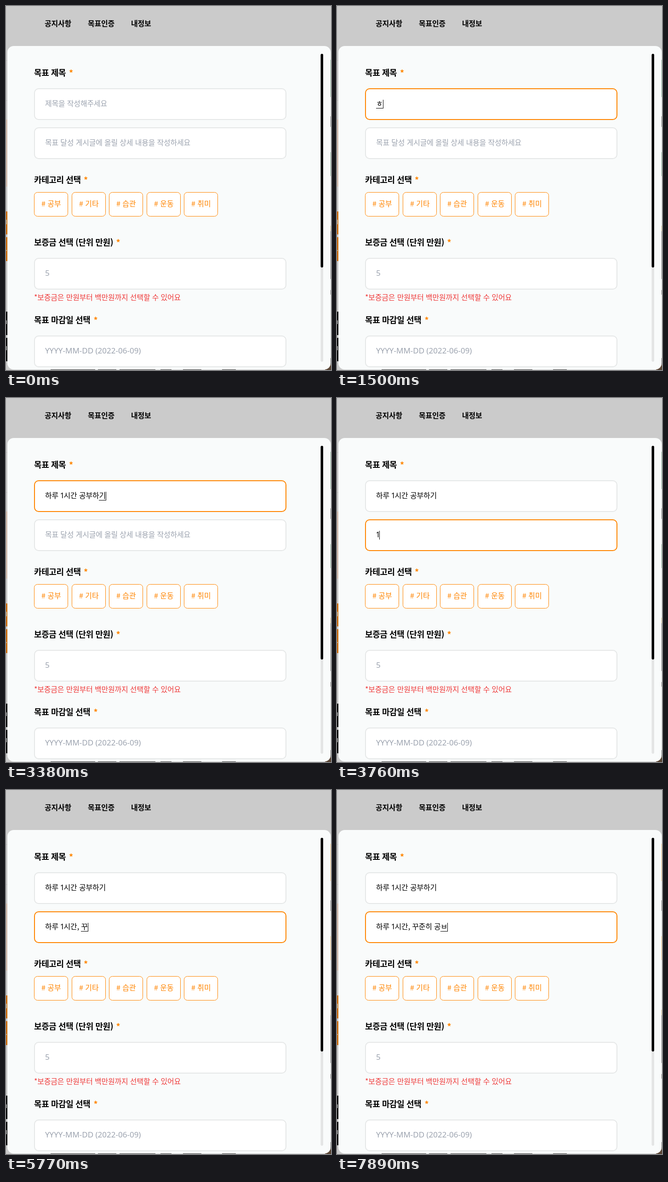
An HTML page for the animation above (8000 ms loop, 707 by 792 pixels).

```html
<!DOCTYPE html>
<html lang="ko">
<head>
<meta charset="utf-8">
<title>목표 작성</title>
<style>
  html, body { margin: 0; width: 100%; height: 100%; overflow: hidden; background: #cbcbcb; }
  svg { display: block; width: 707px; height: 792px; }
  text {
    font: 16px "Noto Sans CJK KR", "Noto Sans KR", "Noto Sans CJK", sans-serif;
    letter-spacing: -.2px; white-space: pre; fill: #000;
  }
  .nav { font-weight: 700; }
  .head { font-size: 18px; font-weight: 700; letter-spacing: -.4px; }
  .star { font-size: 18px; font-weight: 700; fill: #ff8500; text-anchor: middle; }
  .hint { fill: #9ca3af; }
  .latin { font: 17px "Noto Sans", sans-serif; letter-spacing: 0; }
  .warn { fill: #ef3a3a; }
  .tag { fill: #ff8500; font-weight: 500; letter-spacing: 0; }
  .chip { fill: #fff; stroke: #ff8500; }
  .field { fill: #fff; stroke: #e5e7e7; stroke-width: 2; }
  .field.on { stroke: #ff8500; }
  .digit { font-family: "Noto Sans", sans-serif; letter-spacing: -1.4px; }
</style>
</head>
<body>
<svg id="stage" viewBox="0 0 707 792"></svg>
<script>
const NS = 'http://www.w3.org/2000/svg';
const stage = document.getElementById('stage');

function add(tag, attrs, content = '', parent = stage) {
  const el = document.createElementNS(NS, tag);
  for (const k in attrs) el.setAttribute(k, attrs[k]);
  el.textContent = content;
  return parent.appendChild(el);
}
const rect = (x, y, width, height, fill, rx = 0) => add('rect', { x, y, width, height, fill, rx });
const label = (x, y, cls, s) => add('text', { x, y, class: cls }, s);
const field = y => add('rect', { x: 62, y: y + 1, width: 547, height: 67, rx: 9, class: 'field' });
function heading(y, s, starX) {
  label(61, y + 6.5, 'head', s);
  label(starX, y + 8, 'star', '*');
}

// Page showing around the dialog
rect(0, 0, 707, 792, '#cbcbcb');
[[118, 1, '#bdbdbd'], [205, 1, '#bdbdbd'], [247, 146, '#d2bdb0'], [447, 50, '#cc6e00'],
 [503, 52, '#cc6e00'], [665, 51, '#000'], [722, 51, '#000']]
  .forEach(([y, h, c]) => rect(0, y, 4, h, c));
[[465, 10], [531, 2], [684, 8], [740, 9]].forEach(([y, h]) => rect(0, y, 1.5, h, '#ccc'));
const cards = [[117, 81], [318, 52]].map(([y, h]) => rect(705, y, 2, h, '#2f6b45'));
[[240, 23], [490, 104], [618, 10], [766, 26]].forEach(([y, h]) => rect(705, y, 2, h, '#1b1b1b'));
rect(705, 478, 2, 12, '#a8842c');
[[97, 97], [200, 40], [247, 78], [336, 24], [385, 40], [470, 30]]
  .forEach(([x, w]) => rect(x, 791, w, 1, '#222'));
rect(694, 780, 13, 12, '#5a4636');

// Dialog
rect(3, 87, 703.4, 704, '#f9fbfb', 14);
[[84, '공지사항'], [178, '목표인증'], [272, '내정보']].forEach(([x, s]) => label(x, 44, 'nav', s));
rect(684.5, 104, 5.5, 670, '#e4e5e5', 2.75);
rect(684.5, 104, 5.5, 465, '#000', 2.75);

heading(145, '목표 제목', 141.5);
heading(378, '카테고리 선택', 173.5);
heading(514, '보증금 선택 (단위 만원)', 244);
heading(683, '목표 마감일 선택', 195);

['공부', '기타', '습관', '운동', '취미'].forEach((s, i) => {
  const x = 61 + Math.round(i * 81.6);
  add('rect', { x: x + .5, y: 405.5, width: 73, height: 52, rx: 7, class: 'chip' });
  label(x + 16, 436, 'tag', '# ' + s);
});

field(548);
label(85, 587, 'hint latin', '5');
label(61, 640, 'warn', '*보증금은 만원부터 백만원까지 선택할 수 있어요');
field(717);
label(85, 756, 'hint latin', 'YYYY-MM-DD (2022-06-09)');

// Editable fields
const inputs = [[179, '제목을 작성해주세요'], [264, '목표 달성 게시글에 올릴 상세 내용을 작성하세요']]
  .map(([y, hint]) => ({
    box: field(y),
    hint: label(85, y + 39, 'hint', hint),
    text: label(85, y + 39, '', ''),
    line: rect(85, y + 43, 15, 1, '#000'),
    caret: rect(85, y + 25, 1, 19, '#000')
  }));

const TITLE = '하루 1시간 공부하기';
const LOOP = 8000, SLIDE = 5000, BLINK = 500;

// [time, focused field, its text]
const steps = [
  [0, -1, ''], [860, 0, ''],
  [1500, 0, 'ㅎ'], [1620, 0, '하'], [1750, 0, '할'], [1870, 0, '하루'], [2000, 0, '하루 '],
  [2120, 0, '하루 1'], [2250, 0, '하루 1ㅅ'], [2370, 0, '하루 1시'], [2500, 0, '하루 1시가'],
  [2620, 0, '하루 1시간 ㄱ'], [2750, 0, '하루 1시간 공'], [2870, 0, '하루 1시간 공부'],
  [3000, 0, '하루 1시간 공붛'], [3130, 0, '하루 1시간 공부하'],
  [3250, 0, '하루 1시간 공부학'], [3380, 0, TITLE],
  [3510, 1, ''], [3760, 1, '1'], [4130, 1, ''],
  [4260, 1, '하'], [4380, 1, '할'], [4520, 1, '하루'], [4650, 1, '하루 '], [4770, 1, '하루 1'],
  [4900, 1, '하루 1ㅅ'], [5020, 1, '하루 1시'], [5140, 1, '하루 1식'], [5270, 1, '하루 1시가'],
  [5390, 1, '하루 1시간'], [5520, 1, '하루 1시간,'], [5640, 1, '하루 1시간, ㄲ'],
  [5770, 1, '하루 1시간, 꾸'], [5890, 1, '하루 1시간, 꾸ㅈ'], [6010, 1, '하루 1시간, 꾸주'],
  [6150, 1, '하루 1시간, 꾸준히'], [6270, 1, '하루 1시간, 꾸준히 고'],
  [6650, 1, '하루 1시간, 꾸준히 ㄱ'], [6770, 1, '하루 1시간, 꾸준히 '], [6900, 1, '하루 1시간, 꾸준히'],
  [7030, 1, '하루 1시간, 꾸준'], [7150, 1, '하루 1시간, 꾸주'], [7280, 1, '하루 1시간, 꾸ㅈ'],
  [7410, 1, '하루 1시간, 꾸주'], [7530, 1, '하루 1시간, 꾸준'], [7650, 1, '하루 1시간, 꾸준히'],
  [7770, 1, '하루 1시간, 꾸준히 공'], [7890, 1, '하루 1시간, 꾸준히 공ㅂ']
];

function setText(el, s) {
  el.textContent = '';
  for (const part of s.split(/(\d)/)) {
    if (part) add('tspan', /\d/.test(part) ? { class: 'digit', dx: -.5 } : {}, part, el);
  }
}
const show = (el, on) => el.setAttribute('visibility', on ? 'visible' : 'hidden');

function apply([, focus, typed]) {
  inputs.forEach((f, i) => {
    const on = i === focus;
    const s = on ? typed : i < focus ? TITLE : '';
    setText(f.text, s);
    f.box.classList.toggle('on', on);
    show(f.hint, !s);
    const end = Math.round(s ? f.text.getEndPositionOfChar(s.length - 1).x : 85);
    show(f.line, on && /[ㄱ-ㅎ가-힣]$/.test(s));
    f.line.setAttribute('x', end - 15);
    f.caret.setAttribute('x', end);
  });
}

let current = null;
function draw(now) {
  const t = now % LOOP;
  const step = steps.findLast(s => s[0] <= t);
  if (step !== current) apply(current = step);
  const lit = Math.floor((t - step[0]) / BLINK) % 2 === 0;
  inputs.forEach((f, i) => show(f.caret, i === step[1] && lit));
  cards.forEach(c => c.setAttribute('fill', t < SLIDE ? '#2f6b45' : '#d98a1c'));
  requestAnimationFrame(() => draw(performance.now() - start));
}
const start = performance.now();
draw(0);
</script>
</body>
</html>
```
